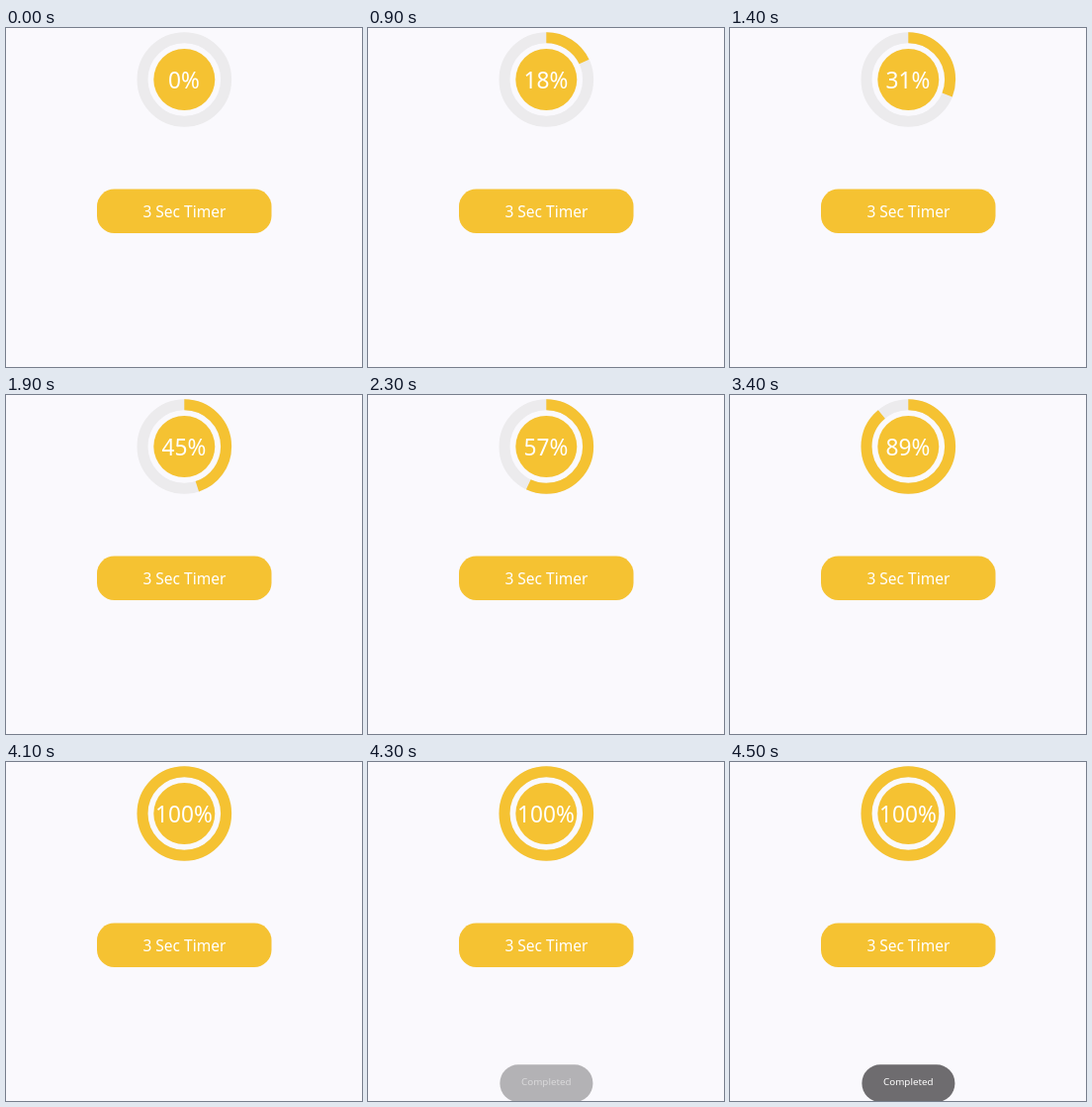
An HTML page with a canvas that plays this animation: 360 by 342 pixels, repeating every 6100 ms.

```html
<!DOCTYPE html>
<html lang="en">
<head>
<meta charset="utf-8">
<title>Timer</title>
<style>
html, body { margin: 0; width: 100%; height: 100%; overflow: hidden; background: #faf9fd; }
canvas { display: block; width: 360px; height: 342px; }
</style>
</head>
<body>
<canvas id="stage"></canvas>
<script>
const W = 360, H = 342, LOOP = 6100, TICK = 100;
const BG = '#faf9fd', YELLOW = '#f5c232', TRACK = '#ecebed', TOAST = '#6e6c6f';
const CX = 180.3, CY = 52;
// time in ms, percent
const KEYS = [[300, 0], [900, 18], [1400, 31], [2300, 57], [2800, 72], [3800, 100]];

const canvas = document.getElementById('stage');
const ctx = canvas.getContext('2d');
const dpr = window.devicePixelRatio || 1;
canvas.width = W * dpr;
canvas.height = H * dpr;

const clamp = v => Math.min(1, Math.max(0, v));

function percentAt(t) {
  let p = 0;
  for (let i = 1; i < KEYS.length; i++) {
    const [t0, p0] = KEYS[i - 1], [t1, p1] = KEYS[i];
    p += (p1 - p0) * clamp((t - t0) / (t1 - t0));
  }
  return Math.round(p);
}

function pill(x, y, w, h, r, color) {
  ctx.fillStyle = color;
  ctx.beginPath();
  ctx.roundRect(x, y, w, h, r);
  ctx.fill();
}

function label(text, x, y, size) {
  ctx.font = `${size}px "Noto Sans", "Open Sans", sans-serif`;
  ctx.fillStyle = '#fff';
  ctx.fillText(text, x, y);
}

function ring(part, color) {
  ctx.strokeStyle = color;
  ctx.lineWidth = 11;
  ctx.beginPath();
  ctx.arc(CX, CY, 42.3, -Math.PI / 2, -Math.PI / 2 + part * 2 * Math.PI);
  ctx.stroke();
}

function draw(time) {
  const t = Math.floor(time / TICK) * TICK;
  const percent = percentAt(t);
  ctx.setTransform(dpr, 0, 0, dpr, 0, 0);
  ctx.textAlign = 'center';
  ctx.fillStyle = BG;
  ctx.fillRect(0, 0, W, H);

  ring(1, TRACK);
  if (percent > 0) ring(percent / 100, YELLOW);
  ctx.fillStyle = YELLOW;
  ctx.beginPath();
  ctx.arc(CX, CY, 31, 0, 2 * Math.PI);
  ctx.fill();
  label(percent + '%', CX - 0.3, 61, 22.7);

  pill(92, 162.5, 176.5, 44.5, 17.5, YELLOW);
  label('3 Sec Timer', 180.4, 191, 15.5);

  const alpha = clamp((t - 4100) / 400);
  if (alpha > 0) {
    ctx.globalAlpha = alpha;
    pill(133.4, 305.3, 94, 37.7, 18.5, TOAST);
    label('Completed', 180.3, 326, 9.8);
    ctx.globalAlpha = 1;
  }
}

const start = performance.now();
function frame() {
  draw((performance.now() - start) % LOOP);
  requestAnimationFrame(frame);
}
frame();
</script>
</body>
</html>
```
